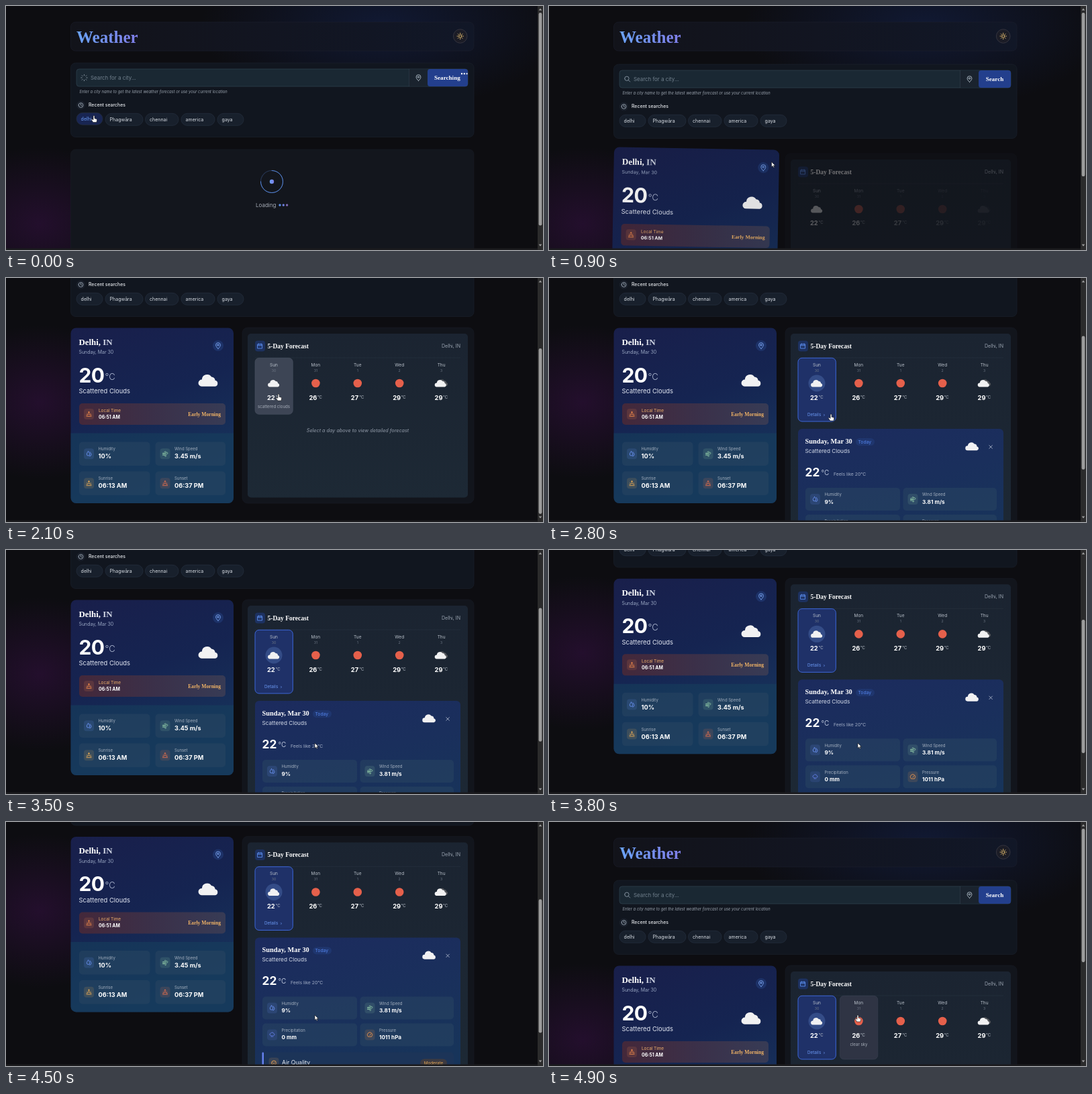
Recreate the animation shown at these times as an HTML page. Size 800 by 364 pixels, loop 5 s.

```html
<!DOCTYPE html>
<html lang="en">
<head>
<meta charset="utf-8">
<title>Weather</title>
<style>
html,body{margin:0;height:100%;overflow:hidden;background:#0d0d11}
svg{display:block;width:100vw;height:100vh}
text{font-family:Inter,"Open Sans",sans-serif;white-space:pre}
.s{font-family:"Liberation Serif",serif;font-weight:700}
.b{font-weight:700}
.i{font-style:italic}
.m{text-anchor:middle}
.l{fill:none;stroke-width:.9;stroke-linecap:round;stroke-linejoin:round}
</style>
</head>
<body>
<svg id="stage" viewBox="0 0 800 364" preserveAspectRatio="none"></svg>
<script>
const LOOP = 5000;
const text = (x, y, size, str, fill = '#fff', cls = '', more = '') =>
  `<text x="${x}" y="${y}" font-size="${size}" fill="${fill}" class="${cls}" ${more}>${str}</text>`;
const box = (x, y, w, h, r, fill, more = '') =>
  `<rect x="${x}" y="${y}" width="${w}" height="${h}" rx="${r}" fill="${fill}" ${more}/>`;
const dot = (x, y, r, fill, more = '') => `<circle cx="${x}" cy="${y}" r="${r}" fill="${fill}" ${more}/>`;
const group = (id, body, more = '') => `<g id="${id}" ${more}>${body}</g>`;
const fade = (id, x2, y2, ...colors) =>
  `<linearGradient id="${id}" x2="${x2}" y2="${y2}">${colors.map((c, i) =>
    `<stop offset="${i / (colors.length - 1)}" stop-color="${c}"/>`).join('')}</linearGradient>`;
const glow = (id, color, o) =>
  `<radialGradient id="${id}"><stop stop-color="${color}" stop-opacity="${o}"/><stop offset="1" stop-color="${color}" stop-opacity="0"/></radialGradient>`;

const shapes = {
  pin: 'M0 4.5C-2 2.5-3.4.8-3.4-1a3.4 3.4 0 0 1 6.8 0C3.4.8 2 2.5 0 4.5ZM-1.2-1a1.2 1.2 0 1 0 2.4 0a1.2 1.2 0 1 0-2.4 0',
  find: 'M-3.8-.8a3.2 3.2 0 1 0 6.4 0a3.2 3.2 0 1 0-6.4 0M1.8 1.6L4.2 4',
  clock: 'M-3.4 0a3.4 3.4 0 1 0 6.8 0a3.4 3.4 0 1 0-6.8 0M0-2V0L1.4.8',
  drop: 'M-1-3.5C-2.4-1.7-3.2-.6-3.2.6a2.2 2.2 0 0 0 4.4 0C1.2-.6.4-1.7-1-3.5ZM1.6-2.6C3-.8 3.6.4 3.4 1.6A2.4 2.4 0 0 1 1 3.5',
  wind: 'M-3.5-1H0A1.2 1.2 0 1 0-1-2.6M-3.5.5H2.4A1.4 1.4 0 1 0 1.3-1.7M-3.5 2H.4A1 1 0 1 1-.4 3.4',
  rise: 'M-3.6 3.4H3.6M-3.6 1.5H-2.6M2.6 1.5H3.6M-1.8 1.5a1.8 1.8 0 0 1 3.6 0M0-3.6V-1.4M-1.2-2.5L0-3.6L1.2-2.5M-2.7-.8L-2.2-.3M2.7-.8L2.2-.3',
  rain: 'M-2.2 1.2A1.8 1.8 0 0 1-2-2.3A2.4 2.4 0 0 1 2.4-1.7A1.5 1.5 0 0 1 2.4 1.2M-1.2 1V3.2M.8 1V3.2',
  gauge: 'M-2.8 2.5A3.7 3.7 0 1 1 2.8 2.5ZM0 .8L1.7-1.4',
  cal: 'M-3.3-2.7H3.3V3.5H-3.3ZM-3.3-.7H3.3M-1.7-3.7V-2M1.7-3.7V-2',
  air: 'M-3.4 0a3.4 3.4 0 1 0 6.8 0a3.4 3.4 0 1 0-6.8 0M-1.4 1.4a1.8 1.8 0 0 1 2.8 0M-1.2-1V-.8M1.2-1V-.8',
  rays: Array.from({length: 8}, (_, i) => {
    const c = Math.cos(i * Math.PI / 4), s = Math.sin(i * Math.PI / 4);
    return `M${c * 3.3} ${s * 3.3}L${c * 4.7} ${s * 4.7}`;
  }).join('')
};
const icon = (name, x, y, color, k = 1) =>
  `<path class="l" d="${shapes[name]}" stroke="${color}" transform="translate(${x} ${y}) scale(${k})"/>`;
const badge = (name, x, y, color) =>
  box(x - 7.5, y - 8, 15, 16, 4, color, 'opacity=".14"') + icon(name, x, y, color);
const cloud = (x, y, k, fill = '#f1f1f2') =>
  `<path d="M-11 10A5.5 5.5 0 0 1-10.5-1A8.5 8.5 0 0 1 5-5.5A6 6 0 0 1 11 .2A5 5 0 0 1 11 10Z" fill="${fill}" transform="translate(${x} ${y}) scale(${k})"/>`;
const tile = (id, x, y, w, h, name, color, label, value, size) => group(id,
  box(x, y, w, h, 5, '#2b4763', 'opacity=".5"') + badge(name, x + 14.5, y + h / 2, color) +
  text(x + 28.5, y + h * .36, 6, label, '#a3afbf') + text(x + 28.5, y + h * .7, size, value, '#fff', 'b'));

const cx = i => 399 + i * 62.4;
const days = [['Sun', 30, 22], ['Mon', 31, 26], ['Tue', 1, 27], ['Wed', 2, 29], ['Thu', 3, 29]];
const chips = [['delhi', 105, 39], ['Phagwāra', 148, 56], ['chennai', 207.5, 49.5], ['america', 261, 50], ['gaya', 315, 39]];

const day = ([name, date, deg], i) => group('day' + i,
  text(cx(i), 272, 6.5, name, '#b9c0ca', 'm') + text(cx(i), 280, 5.2, date, '#6d7684', 'm') +
  (i % 4 ? dot(cx(i), 297, 6.3, '#e5604b')
    : (i ? cloud(cx(i) + 2, 296, .5, '#52555a') : '') + cloud(cx(i) - (i ? 1 : 0), 297, .55)) +
  text(cx(i) - 10, 321.5, 9.3, deg, '#fff', 'b') + text(cx(i) + 2.5, 319.5, 6, '°C', '#b9c0ca'));

const header =
  box(96.5, 24, 600.5, 43, 7, 'url(#head)', 'stroke="#1c1f2c" stroke-width=".6"') +
  text(105, 55, 25, 'Weather', 'url(#title)', 's') +
  dot(676.7, 45, 10.3, '#1b1c26', 'stroke="#3b3c46" stroke-width=".8"') +
  dot(676.7, 45, 2, 'none', 'stroke="#e9c170"') + icon('rays', 676.7, 45, '#e9c170');

const search = group('search',
  box(96.5, 87, 600.5, 110.5, 7, '#11161f', 'stroke="#1a202c" stroke-width=".7"') +
  box(105, 96, 583, 26, 4, '#1a2833', 'stroke="#30424f" stroke-width=".7"') +
  group('lens', icon('find', 116.5, 109, '#8b98a5')) + group('wait', icon('rays', 0, 0, '#8b98a5')) +
  text(126, 112, 7.9, 'Search for a city...', '#72818e') +
  group('locate', '<path d="M612.5 96V122" stroke="#3b4d5b" stroke-width=".8"/>' + box(612.5, 96.4, 28, 25.2, 0, '#1a232e') + icon('pin', 626.5, 109, '#b8c4d0')) +
  group('go', box(640, 96, 48, 26, 4, '#233f8d') + text(664, 112.2, 9, 'Search', '#fff', 's m')) +
  group('busy', box(628, 96, 60, 26, 4, '#233f8d') + text(638, 112.2, 9.1, 'Searching', '#fff', 's') +
    [0, 1, 2].map(i => dot(679 + i * 3.8, 103, 1.2, '#fff', 'class="beat"')).join('')) +
  text(109.5, 132.3, 5.85, 'Enter a city name to get the latest weather forecast or use your current location', '#9aa3ae', 'i') +
  dot(111.5, 150, 6.5, '#1a202b') + icon('clock', 111.5, 150, '#9aa6b4') +
  text(123, 152.4, 6.9, 'Recent searches', '#e8ebef', '', 'font-weight="500"') +
  chips.map(([name, x, w], i) => group('chip' + i,
    box(x, 162.3, w, 18, 9, '#18202c', 'stroke="#263040" stroke-width=".7"') +
    text(x + 6.6, 173.7, 7, name, '#d9dee5'))).join(''));

const loading = group('loading',
  box(96.5, 214, 600.5, 163, 7, '#13161d', 'stroke="#1a1d26" stroke-width=".6"') +
  dot(396, 262, 16.5, 'none', 'stroke="#263552" stroke-width="1.2"') +
  group('spin', '<path class="l" d="M0-16.5A16.5 16.5 0 1 1-16.5 0" stroke="#5b8fe8" stroke-width="1.3"/>') +
  dot(396, 262, 3.2, 'url(#title)') + text(372, 300, 8, 'Loading', '#a5abb5') +
  [0, 1, 2].map(i => dot(408 + i * 5.3, 297, 1.7, ['#5b8fe8', '#7488ea', '#9a80d8'][i], 'class="beat"')).join(''));

const today = group('today',
  box(96.5, 214.5, 242.5, 261.5, 8, 'url(#blue)') +
  '<path d="M96.5 371.5H339V468A8 8 0 0 1 331 476H104.5A8 8 0 0 1 96.5 468Z" fill="#17405e" opacity=".55"/>' +
  text(108.5, 240, 12.9, 'Delhi, <tspan fill="#cfd5e4">IN</tspan>', '#fff', 's') +
  text(108.5, 253.2, 6.95, 'Sunday, Mar 30', '#9aa8c4') +
  dot(316, 241, 8, '#1d3268') + icon('pin', 316, 241, '#7da9f7') +
  text(108.5, 295.5, 30, '20', '#fff', 'b', 'letter-spacing="-.7"') + text(147.5, 292, 13, '°C', '#aeb9d2', '', 'font-weight="300"') +
  text(108.5, 312.2, 9.4, 'Scattered Clouds', '#e2e7f2') + cloud(301.5, 292.5, .92) +
  box(109, 327, 218, 32, 5, 'url(#dawn)') + badge('rise', 123.5, 343, '#f08a4b') +
  text(138, 340, 6.4, 'Local Time', '#f3b26c') + text(138, 349.6, 6.9, '06:51 AM', '#fff', 'b') +
  text(320, 346, 7.6, 'Early Morning', '#f0b366', 's', 'text-anchor="end"') +
  tile('t0', 109, 384.5, 105.5, 35.5, 'drop', '#6c95f5', 'Humidity', '10%', 9.2) +
  tile('t1', 222.5, 384.5, 104.5, 35.5, 'wind', '#8fc9a8', 'Wind Speed', '3.45 m/s', 9.1) +
  tile('t2', 109, 428.5, 105.5, 35.5, 'rise', '#e8ab56', 'Sunrise', '06:13 AM', 9.2) +
  tile('t3', 222.5, 428.5, 104.5, 35.5, 'rise', '#e8704d', 'Sunset', '06:37 PM', 9.2));

const panel = group('panel',
  box(371, 365, 306, 213.5, 6, 'url(#panelFill)') +
  text(381.5, 387, 10.35, 'Sunday, Mar 30', '#fff', 's') +
  box(457, 379, 28, 11, 5.5, '#234080', 'opacity=".5"') + text(460.5, 387, 6.8, 'Today', '#5484ee') +
  text(381.5, 401, 8.2, 'Scattered Clouds', '#d5dcea') + cloud(630.5, 391, .63) +
  '<path class="l" d="M655.8 389.7l4.6 4.6m0-4.6l-4.6 4.6" stroke="#a7b2c8"/>' +
  text(381.5, 436, 17.3, '22', '#fff', 'b') + text(405.5, 434, 10, '°C', '#b7c2d8') +
  text(424, 434.5, 6.85, 'Feels like 20°C', '#a2aec6') +
  tile('', 382, 453, 141, 34, 'drop', '#6c95f5', 'Humidity', '9%', 8.2) +
  tile('', 527.5, 453, 139.5, 34, 'wind', '#8fc9a8', 'Wind Speed', '3.81 m/s', 8.2) +
  tile('', 382, 493, 141, 34, 'rain', '#6681e8', 'Precipitation', '0 mm', 8.2) +
  tile('', 527.5, 493, 139.5, 34, 'gauge', '#e8944d', 'Pressure', '1011 hPa', 8.2) +
  box(381.5, 536, 285.5, 32, 5, '#1e3658', 'opacity=".7"') + box(381.5, 536, 2.5, 32, 1.2, '#6681f0') +
  badge('air', 399, 552, '#e8a04d') + text(411, 555, 8.6, 'Air Quality', '#eef1f6') +
  box(617, 546, 40, 12, 6, '#3c3a41') + text(637, 554.3, 6.3, 'Moderate', '#e5a650', 'm'));

const forecast = group('forecast',
  box(352, 214, 345, 262, 8, '#12151c', 'id="outer" stroke="#191c25" stroke-width=".6"') +
  box(360, 223, 328, 244.5, 5, 'url(#slate)', 'id="inner"') +
  box(371, 233.5, 15, 16, 4, '#1d3160') + icon('cal', 378.3, 241.5, '#5d8ff0') +
  text(389.5, 245, 9.5, '5-Day Forecast', '#fff', 's') + text(677, 243.6, 7.05, 'Delhi, IN', '#98a1ae', '', 'text-anchor="end"') +
  '<path d="M371 259H677" stroke="#2a3441" stroke-width=".5"/>' +
  box(371, 259.3, 56.3, 84, 6, '#3d4555', 'id="hot0" stroke="#4a5262" stroke-width=".6"') +
  box(433.3, 259.3, 56.5, 94.7, 6, '#2f3444', 'id="hot1" stroke="#3b4252" stroke-width=".6"') +
  group('picked', box(371, 259.3, 56.3, 94.7, 6, '#1f3168', 'stroke="#3d66d8" stroke-width="1"') +
    dot(399, 297, 12.5, '#344c87') + text(385, 345.5, 6.3, 'Details  ›', '#6c9af5')) +
  days.map(day).join('') +
  text(399, 334, 6.1, 'scattered clouds', '#a8afba', 'm', 'id="hint0"') +
  text(461.4, 334, 6.1, 'clear sky', '#a8afba', 'm', 'id="hint1"') +
  text(524, 369.5, 7.25, 'Select a day above to view detailed forecast', '#949dab', 'i m', 'id="ask"') + panel);

const stage = document.getElementById('stage');
stage.innerHTML = `<defs>
  ${fade('title', 1, 0, '#6aa2f5', '#7f7ee8')}${fade('head', 1, 0, '#12131a', '#121521', '#111727')}
  ${fade('blue', .35, 1, '#191f4b', '#152451', '#17345c')}${fade('dawn', 1, 0, '#44283a', '#3b3049', '#373b55')}
  ${fade('panelFill', .4, 1, '#1c2b5e', '#1a2f5c', '#17345a')}${fade('slate', 0, 1, '#1b2431', '#1d2935')}
  ${glow('violet', '#32103f', .6)}${glow('navy', '#14234f', .55)}</defs>
  <rect width="800" height="364" fill="#0d0d11"/>` +
  group('page', '<ellipse cx="50" cy="325" rx="150" ry="115" fill="url(#violet)"/><ellipse cx="560" cy="30" rx="270" ry="125" fill="url(#navy)"/>' +
    header + search + loading + today + forecast) +
  box(0, 361.5, 792, 2.5, 0, '#1b1b1e') + box(792, 0, 8, 364, 0, '#2b2b2c') +
  '<path d="M793.7 6.5L796 3.5L798.3 6.5ZM793.7 355.5L796 358.5L798.3 355.5Z" fill="#a0a0a0"/>' +
  box(793.6, 10, 4.8, 300, 2.4, '#9d9d9d', 'id="thumb"') +
  group('mouse', '<path id="arrow" d="M0 0V7.5L1.8 5.9L3 8.5L4.2 7.9L3 5.4H5.4Z"/>' +
    '<path id="hand" d="M-1 1Q-1 0 0 0T1 1V4.2L3.6 5Q4.8 5.4 4.6 6.6L4 10H-1.2L-4 6Q-3.2 4.6-1.8 5.8L-1 6.4Z"/>',
    'fill="#fff" stroke="#111" stroke-width=".6"');

const el = {};
stage.querySelectorAll('[id]').forEach(n => el[n.id] = n);
const beats = stage.querySelectorAll('.beat');
const set = (id, name, v) => el[id].setAttribute(name, v);
const alpha = (id, v) => set(id, 'opacity', v);
const move = (id, x, y) => set(id, 'transform', `translate(${x} ${y})`);
const ramp = (t, a, b) => Math.min(1, Math.max(0, (t - a) / (b - a)));
const ease = (t, a, b) => { const p = ramp(t, a, b); return p * p * (3 - 2 * p); };
const track = (t, keys) => keys.slice(1).reduce((v, [at, to], i) =>
  v + (to - keys[i][1]) * ease(t, keys[i][0], at), keys[0][1]);

const scrollKeys = [[0, 0], [950, 0], [1280, 145.5], [1550, 145.5], [1800, 140], [3600, 140], [4200, 261], [4350, 261], [4800, 0]];
const mouseX = [[0, 131], [500, 131], [850, 331.5], [1500, 331.5], [2000, 406], [2600, 406], [3200, 460]];
const mouseY = [[0, 163.5], [500, 163.5], [850, 232.5], [1500, 232.5], [2000, 173], [2600, 173], [3200, 288]];

function draw(t) {
  const busy = t < 550, open = ease(t, 2400, 2750), scroll = track(t, scrollKeys);
  const x = track(t, mouseX), y = track(t, mouseY), py = y + scroll;
  const tilt = ease(t, 600, 850) * (1 - ease(t, 1550, 1800));
  const lift = 1 - ease(t, 550, 750);
  const inRow = py > 259 && py < 354;
  const sun = inRow && x > 371 && x < 427.3, mon = inRow && x > 433.3 && x < 489.8;

  move('page', 0, -scroll);
  move('search', 0, -2 * lift);
  move('chip0', 0, -lift);
  const chip = el.chip0.children;
  chip[0].setAttribute('fill', lift > .5 ? '#182552' : '#18202c');
  chip[1].setAttribute('fill', lift > .5 ? '#6a9cf4' : '#d9dee5');
  move('locate', busy ? -12 : 0, 0);
  for (const id of ['busy', 'wait', 'loading']) alpha(id, +busy);
  for (const id of ['go', 'lens']) alpha(id, +!busy);
  set('wait', 'transform', `translate(116.5 109) rotate(${t * .36})`);
  set('spin', 'transform', `translate(396 262) rotate(${t * .36})`);
  beats.forEach((n, i) => n.setAttribute('opacity', .75 + .25 * Math.cos(t / 1000 * 2 * Math.PI - i % 3 * .7)));

  alpha('today', ramp(t, 550, 930));
  set('today', 'transform', `translate(217.7 345) rotate(${tilt}) scale(${1 + .015 * tilt}) translate(-217.7 -345)`);
  for (let i = 0; i < 4; i++) alpha('t' + i, ramp(t, 1000 + i * 50, 1400 + i * 70));

  const enter = ramp(t, 650, 1250);
  alpha('forecast', enter);
  move('forecast', 0, 16 * (1 - enter) ** 3 * 1.9);
  days.forEach((_, i) => alpha('day' + i, ramp(t, 600 + i * 60, 1000 + i * 100)));
  set('outer', 'height', 262 + 122 * open);
  set('inner', 'height', 244.5 + 121.5 * open);
  alpha('ask', 1 - ramp(open, 0, .4));
  alpha('panel', ramp(open, .3, 1));
  alpha('picked', ramp(open, 0, .5));
  alpha('hot0', sun ? 1 - open : 0);
  alpha('hint0', sun ? 1 - ramp(open, 0, .3) : 0);
  alpha('hot1', +mon);
  alpha('hint1', +mon);

  const height = busy ? 392 : 504 + 5.5 * tilt + 121 * open;
  set('thumb', 'y', 10 + 342 * scroll / height);
  set('thumb', 'height', 342 * 364 / height);
  const hand = t < 560 || sun || mon;
  alpha('hand', +hand);
  alpha('arrow', +!hand);
  move('mouse', x, y);
}

const start = performance.now();
(function tick() {
  draw((performance.now() - start) % LOOP);
  requestAnimationFrame(tick);
})();
</script>
</body>
</html>
```
